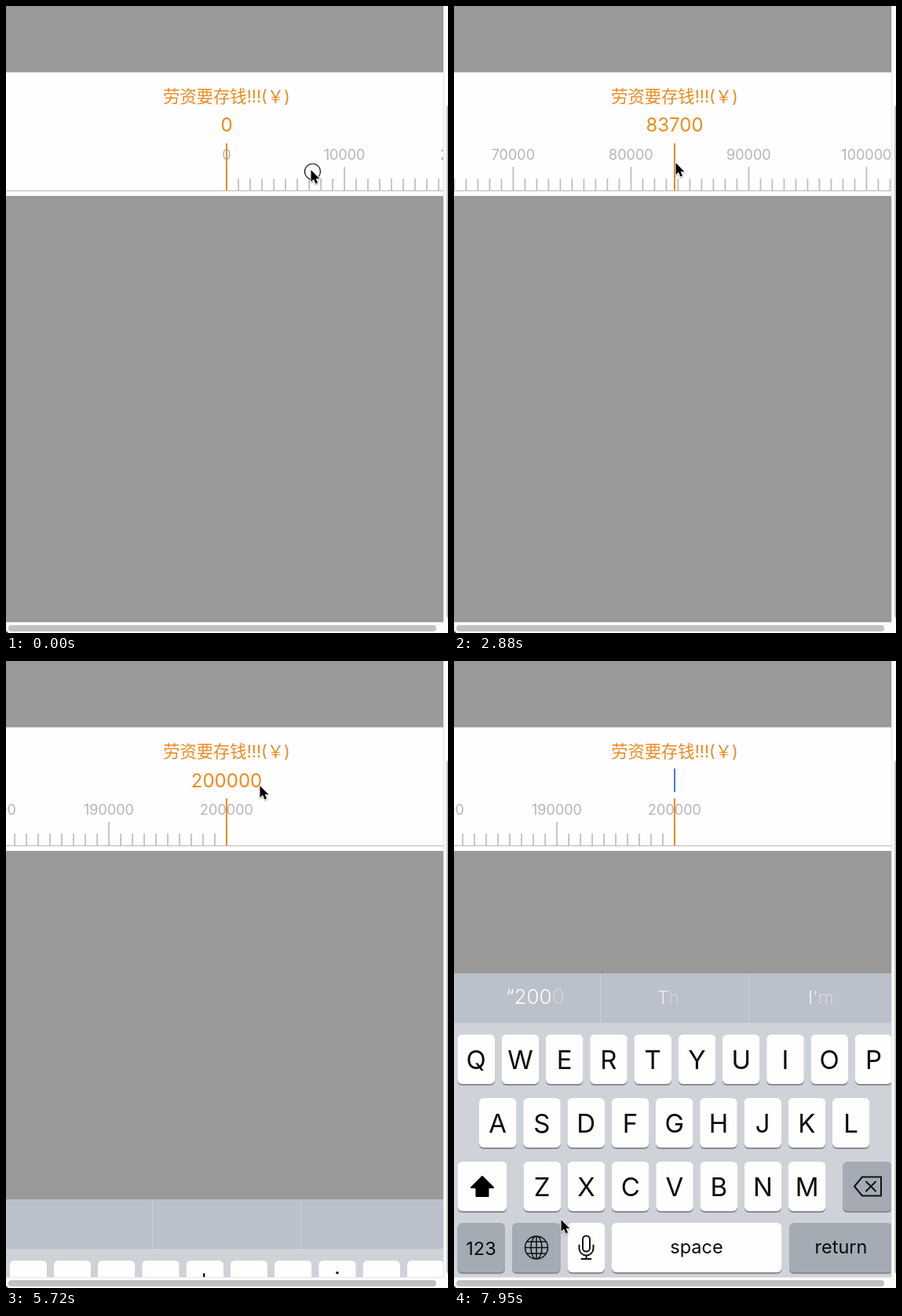
An HTML page with a canvas for the animation above (8000 ms loop, 563 by 799 pixels).

```html
<!DOCTYPE html>
<html lang="zh-CN">
<head>
<meta charset="utf-8">
<title>Ruler picker</title>
<style>
html, body { margin: 0; width: 100%; height: 100%; overflow: hidden; background: #fafafa; }
canvas { display: block; width: 563px; height: 799px; }
</style>
</head>
<body>
<canvas id="stage"></canvas>
<script>
const W = 563, H = 799, LOOP = 8000;
const VIEW_W = 557, VIEW_H = 785, MID = 281;
const ORANGE = '#ee8a1e';
const SANS = 'Inter, "Noto Sans CJK SC", "Noto Sans CJK", "Noto Sans", sans-serif';
const canvas = document.getElementById('stage');
const ctx = canvas.getContext('2d');
const dpr = window.devicePixelRatio || 1;
canvas.width = W * dpr;
canvas.height = H * dpr;

const clamp = (v, a = 0, b = 1) => Math.min(b, Math.max(a, v));
const smooth = p => p * p * (3 - 2 * p);
const glide = (p, dt) => (1 - Math.exp(-0.002 * p * dt)) / (1 - Math.exp(-0.002 * dt));
const easeIn = p => p * p;
const linear = p => p;

// Pointer tip: time, x, y
const POINTER = [
  [60, 388, 209], [840, 438, 212], [1130, 438, 212], [1190, 443, 212],
  [1340, 443, 212], [1640, 283, 204], [2300, 283, 204], [2460, 438, 205],
  [2480, 438, 205], [2700, 282, 200], [3510, 282, 200], [3615, 390, 199],
  [3630, 390, 199], [3810, 120, 192], [4270, 120, 192], [4600, 302, 203],
  [4670, 302, 203], [5150, 323, 159], [5720, 323, 159], [6140, 482, 533],
  [6420, 522, 668], [7330, 522, 668], [7850, 136, 712], [8000, 136, 712]
];

// Ruler offset in pixels: time, offset, easing of the stretch that ends here
const SCROLL = [
  [1340, 0], [1620, 155, easeIn], [2480, 623.26, glide], [2680, 773, easeIn],
  [3620, 2008.5, glide], [3790, 2278, easeIn], [4010, 3028, linear],
  [4070, 3040, smooth], [4250, 3000, smooth]
];

const PRESSES = [[0, 60], [1340, 1640], [2480, 2700], [3630, 3800], [5290, 5390]];
const EDIT = 5390, TAP = 6480, TAP_GAP = 155, TAP_LEN = 85;

function segment(keys, t) {
  let i = 0;
  while (i < keys.length - 1 && t >= keys[i + 1][0]) i++;
  const a = keys[i], b = keys[Math.min(i + 1, keys.length - 1)];
  const dt = b[0] - a[0];
  return { a, b, dt, p: dt ? clamp((t - a[0]) / dt) : 0 };
}

function pointerAt(t) {
  const { a, b, p } = segment(POINTER, t), e = smooth(p);
  return [a[1] + (b[1] - a[1]) * e, a[2] + (b[2] - a[2]) * e];
}

function scrollAt(t) {
  const { a, b, p, dt } = segment(SCROLL, t);
  return dt ? a[1] + (b[1] - a[1]) * b[2](p, dt) : a[1];
}

function rect(x, y, w, h, color) {
  ctx.fillStyle = color;
  ctx.fillRect(x, y, w, h);
}

function round(x, y, w, h, r, color) {
  ctx.fillStyle = color;
  ctx.beginPath();
  ctx.roundRect(x, y, w, h, r);
  ctx.fill();
}

function text(s, x, y, size, color, weight = 400, align = 'center') {
  ctx.font = `${weight} ${size}px ${SANS}`;
  ctx.textAlign = align;
  ctx.fillStyle = color;
  ctx.fillText(s, x, y);
}

function path(points, dx, dy) {
  ctx.beginPath();
  points.forEach(([x, y]) => ctx.lineTo(x + dx, y + dy));
  ctx.closePath();
}

function pen(color, width) {
  ctx.strokeStyle = color;
  ctx.lineWidth = width;
  ctx.lineJoin = ctx.lineCap = 'round';
}

function digitsAt(t, value) {
  const gone = t < TAP ? 0 : Math.floor((t - TAP) / TAP_GAP) + 1;
  const s = String(value);
  return s.slice(0, Math.max(0, s.length - gone));
}

function drawRuler(off) {
  for (let i = 0; i <= 200; i++) {
    const x = MID + i * 15 - off;
    if (x < -60 || x > VIEW_W + 60) continue;
    const major = i % 10 === 0, top = major ? 205 : 220;
    rect(x - 0.8, top, 1.7, 235 - top, '#bcbcbc');
    if (major) text(String(i * 1000), x, 196.3, 18, '#b5b5b5');
  }
  rect(0, 235, VIEW_W, 1, '#b8b8b8');
  rect(MID - 1, 175, 2, 60, ORANGE);
}

function caretAlpha(t) {
  if (t < EDIT) return 0;
  if (t < 5640) return 1;
  if (t < 5860) return 0;
  if (t < 7450) return 1;
  const ph = (t - 7450) % 1000;
  return ph < 300 ? 1 : ph < 420 ? 1 - (ph - 300) / 120 : ph < 480 ? (ph - 420) / 60 : 0.95;
}

function drawPanel(t) {
  rect(0, 84.5, VIEW_W, 157.5, '#fefefe');
  text('劳资要存钱!!!(￥)', MID, 122.5, 21.3, ORANGE);
  const off = scrollAt(t);
  drawRuler(off);
  const value = clamp(Math.round(off / 0.75) * 50, 0, 200000);
  const digits = digitsAt(t, value);
  text(digits, MID, t < EDIT ? 160 : 161, 24, ORANGE);
  const a = caretAlpha(t);
  if (a) {
    const w = digits ? ctx.measureText(digits).width / 2 - 1 : 0;
    ctx.globalAlpha = a;
    rect(MID + w - (digits ? 0 : 1), 137, digits ? 3 : 2, 30, '#4a6be0');
    ctx.globalAlpha = 1;
  }
}

function key(x, y, w, color = '#fefefe') {
  round(x, y + 1.5, w, 63.5, 6, '#898c91');
  round(x, y, w, 63, 6, color);
}

const ARROW = [[0, -13], [14, 1], [7.5, 1], [7.5, 12], [-7.5, 12], [-7.5, 1], [-14, 1]];

function shiftIcon(x, y, on) {
  path(ARROW, x, y);
  pen('#000', 2);
  ctx.stroke();
  if (on) {
    ctx.fillStyle = '#000';
    ctx.fill();
  }
}

function eraseIcon(x, y, down) {
  path([[-17, 0], [-7, -12], [17, -12], [17, 12], [-7, 12]], x, y);
  pen('#111', 2);
  ctx.stroke();
  if (down) {
    ctx.fillStyle = '#111';
    ctx.fill();
    ctx.strokeStyle = '#fff';
  }
  ctx.beginPath();
  for (const s of [-1, 1]) {
    ctx.moveTo(x - 2, y - 6 * s);
    ctx.lineTo(x + 10, y + 6 * s);
  }
  ctx.stroke();
}

function globeIcon(x, y) {
  pen('#111', 1.5);
  ctx.beginPath();
  ctx.arc(x, y, 14.5, 0, 7);
  ctx.moveTo(x + 7, y);
  ctx.ellipse(x, y, 7, 14.5, 0, 0, 7);
  ctx.moveTo(x, y - 14.5);
  ctx.lineTo(x, y + 14.5);
  for (const [dy, half] of [[-7.5, 12.2], [0, 14.5], [7.5, 12.2]]) {
    ctx.moveTo(x - half, y + dy);
    ctx.lineTo(x + half, y + dy);
  }
  ctx.stroke();
}

function micIcon(x, y) {
  pen('#111', 2);
  ctx.beginPath();
  ctx.roundRect(x - 4.5, y - 15, 9, 20, 4.5);
  ctx.moveTo(x - 9, y - 3);
  ctx.lineTo(x - 9, y + 1);
  ctx.arc(x, y + 1, 9, Math.PI, 0, true);
  ctx.lineTo(x + 9, y - 3);
  ctx.moveTo(x, y + 10);
  ctx.lineTo(x, y + 14);
  ctx.moveTo(x - 6, y + 14.5);
  ctx.lineTo(x + 6, y + 14.5);
  ctx.stroke();
}

// Letters fade in one after the other
function hint(s, x, y, alpha, size = 26) {
  for (const [i, c] of [...s].entries()) {
    const a = clamp(alpha(i));
    if (a) text(c, x, y, size, `rgba(255,255,255,${a})`, 300, 'left');
    ctx.font = `300 ${size}px ${SANS}`;
    x += ctx.measureText(c).width;
  }
}

function drawHints(t, y) {
  if (t < 5950) return;
  if (t < TAP + 60) {
    hint('“200000”', 31, y, i => (t - 5950) / 220 - i * 0.04);
  } else if (t < 7560) {
    const digits = digitsAt(t - 60, 200000) || '2';
    const s = `“${digits}”`;
    ctx.font = `300 26px ${SANS}`;
    hint(s, 92 - ctx.measureText(s).width / 2, y, () => 0.9);
  } else {
    const q = (t - 7950) / 300;
    hint('“2000', 66, y, i => (i < 4 ? 0.95 : 0.3 - q * 0.5));
    hint('The', 259, y, i => 0.72 + q - i * 0.42, 23);
    hint("I'm", 451, y, i => 0.85 + q - i * 0.22, 23);
  }
}

function tapping(t) {
  const d = t - TAP;
  return d >= 0 && d < TAP_GAP * 6 && d % TAP_GAP < TAP_LEN;
}

function drawKeyboard(t) {
  const s = (t - 5662) * 0.0166;
  if (s <= 0) return;
  const top = Math.round(VIEW_H - 387 * (1 - (1 + s) * Math.exp(-s)));
  const upper = t >= TAP + TAP_GAP * 5 + 60;
  const dark = '#a4abb5', ink = '#0a0a0a', step = 56.25;
  rect(0, top, VIEW_W, 388, '#cfd2d8');
  rect(0, top, VIEW_W, 63, '#bac1ca');
  rect(186, top, 1, 63, '#cbd0d7');
  rect(375, top, 1, 63, '#cbd0d7');
  drawHints(t, top + 38.5);

  const rows = [['qwertyuiop', 4.5, 78], ['asdfghjkl', 32, 159], ['zxcvbnm', 88.5, 240]];
  for (const [letters, x0, dy] of rows) {
    [...letters].forEach((c, i) => {
      const x = x0 + i * step, y = top + dy;
      key(x, y, 47.5);
      if (upper) text(c.toUpperCase(), x + 23.7, y + 43.5, 33, ink);
      else text(c, x + 23.7, y + 41, 36, ink, 300);
    });
  }

  const y3 = top + 240, y4 = top + 318, down = tapping(t);
  key(4.5, y3, 63, upper ? '#fefefe' : dark);
  shiftIcon(36, y3 + 32, upper);
  key(495, y3, 63, down ? '#fefefe' : dark);
  eraseIcon(527, y3 + 31.5, down);

  key(4.5, y4, 60.5, dark);
  text('123', 34.5, y4 + 40.5, 23.5, ink);
  key(74, y4, 61.5, dark);
  globeIcon(105, y4 + 31.5);
  key(144.5, y4, 47.5);
  micIcon(168.5, y4 + 31.5);
  key(201, y4, 216.5);
  text('space', 309, y4 + 39, 23.5, ink);
  key(427, y4, 132, dark);
  text('return', 493, y4 + 39, 23.5, ink);
}

function drawScrollbars() {
  rect(VIEW_W, 0, W - VIEW_W, H, '#fbfbfb');
  rect(0, VIEW_H, W, H - VIEW_H, '#fbfbfb');
  rect(VIEW_W, 0, 1, VIEW_H, '#e6e6e6');
  rect(0, VIEW_H, VIEW_W, 1, '#e6e6e6');
  round(561, 126, 8, 655, 4, '#c1c1c1');
  round(3, 789, 545, 8, 4, '#c1c1c1');
  path([[0, 796], [3, 799], [0, 799]], 0, 0);
  ctx.fillStyle = '#333';
  ctx.fill();
}

const CURSOR = [[0, 0], [0, 15], [3.5, 11.8], [6, 17.4], [8.6, 16.3], [6.2, 10.9], [10.8, 10.9]];

function drawPointer(t) {
  const [x, y] = pointerAt(t);
  if (tapping(t) || PRESSES.some(([a, b]) => t >= a && t < b)) {
    pen('#111', 1.2);
    ctx.beginPath();
    ctx.arc(x + 2.5, y + 2, 10, 0, 7);
    ctx.stroke();
  }
  path(CURSOR, x + 0.5, y);
  ctx.save();
  ctx.shadowColor = 'rgba(0,0,0,.35)';
  ctx.shadowBlur = 2 * dpr;
  ctx.shadowOffsetY = dpr;
  pen('#fff', 1.8);
  ctx.stroke();
  ctx.restore();
  ctx.fillStyle = '#000';
  ctx.fill();
}

function draw(t) {
  ctx.setTransform(dpr, 0, 0, dpr, 0, 0);
  rect(0, 0, W, H, '#999');
  ctx.save();
  ctx.beginPath();
  ctx.rect(0, 0, VIEW_W, VIEW_H);
  ctx.clip();
  drawPanel(t);
  drawKeyboard(t);
  ctx.restore();
  drawScrollbars();
  drawPointer(t);
}

const start = performance.now();
function tick() {
  draw((performance.now() - start) % LOOP);
  requestAnimationFrame(tick);
}
tick();
</script>
</body>
</html>
```
